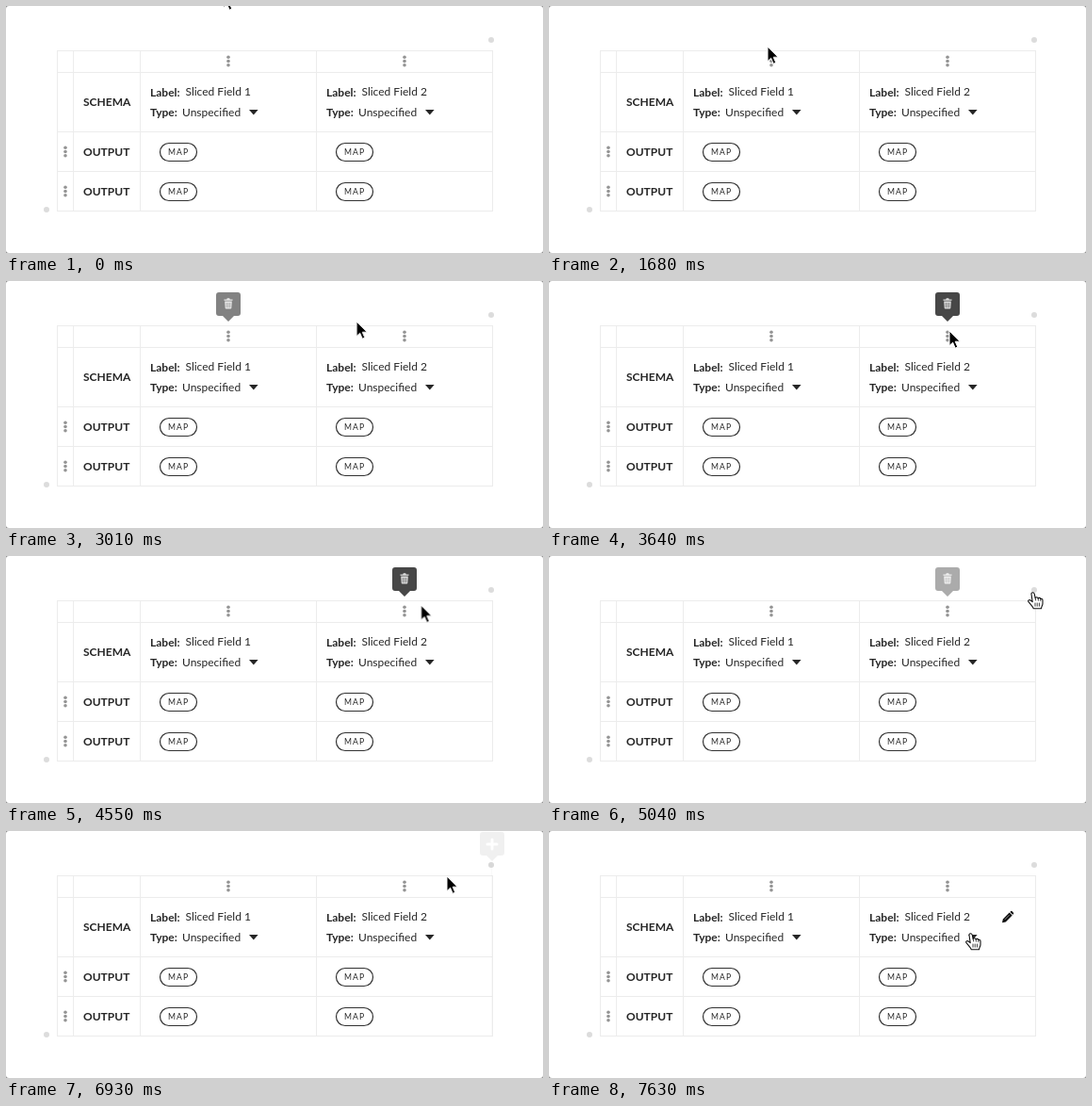
Write an HTML page that moves like this. It is 570 px wide and 262 px high and loops after 8000 ms.

```html
<!DOCTYPE html>
<html lang="en">
<head>
<meta charset="utf-8">
<title>Schema table</title>
<style>
  html, body { margin: 0; width: 100%; height: 100%; overflow: hidden; background: #8a8a8a; }
  svg { display: block; width: 570px; height: 262px; font: 12px Lato, sans-serif; fill: #262626; }
  .bold { font-weight: 700; }
  .grid { stroke: #ececec; fill: none; }
  .kebab, .knob { fill: #949494; }
  .knob { fill: #dcdcdc; }
  .pill rect { fill: #fff; stroke: #333; stroke-width: 1.2; }
  .pill text { font-size: 8.6px; letter-spacing: 1.1px; }

  #tip1, #tip2, #add, #pencil, #cursor, #arrow, #hand { animation: 8s linear infinite; }
  #tip1 { animation-name: tip1; }
  #tip2 { animation-name: tip2; }
  #add { animation-name: add; }
  #pencil { animation-name: pencil; }
  #cursor { animation-name: move; }
  #arrow { animation-name: arrow; animation-timing-function: step-end; }
  #hand { animation-name: hand; animation-timing-function: step-end; }

  @keyframes tip1 {
    0%, 21%, 40%, 100% { opacity: 0; }
    24.5%, 36.5% { opacity: 1; }
  }
  @keyframes tip2 {
    0%, 41.6%, 64.6%, 86.7%, 90.2%, 100% { opacity: 0; }
    45.4%, 61.1% { opacity: 1; }
    88.4% { opacity: .5; }
  }
  @keyframes add {
    0%, 63.9%, 86.9%, 100% { opacity: 0; }
    68.2%, 83.4% { opacity: 1; }
  }
  @keyframes pencil {
    0%, 88.4% { opacity: 0; }
    89.5%, 100% { opacity: 1; }
  }
  @keyframes move {
    0%, 13.2% { transform: translate(231px, -14px); animation-timing-function: ease-in-out; }
    21% { transform: translate(232px, 43px); }
    22.75%, 30.7% { transform: translate(235px, 56px); }
    34.1% { transform: translate(262px, 54px); }
    36.3% { transform: translate(332px, 46px); }
    37.63% { transform: translate(372px, 43px); }
    41.1% { transform: translate(402px, 45px); }
    42.9%, 54.3% { transform: translate(425px, 53px); }
    57.8% { transform: translate(446px, 52px); }
    61.2% { transform: translate(500px, 46px); }
    63%, 82.3% { transform: translate(514px, 39px); }
    84.9% { transform: translate(490px, 40px); }
    86.63% { transform: translate(468px, 48px); }
    88.4% { transform: translate(457px, 70px); }
    92.7% { transform: translate(449px, 103px); }
    95.3%, 100% { transform: translate(448px, 109px); }
  }
  @keyframes arrow {
    0%, 83.1% { opacity: 1; }
    62.1%, 93.6%, 100% { opacity: 0; }
  }
  @keyframes hand {
    0%, 83.1% { opacity: 0; }
    62.1%, 93.6%, 100% { opacity: 1; }
  }
</style>
</head>
<body>
<svg viewBox="0 0 570 262">
  <defs>
    <g id="dots"><circle cy="-4.2" r="1.8"/><circle r="1.8"/><circle cy="4.2" r="1.8"/></g>
    <path id="bubble" fill="#474747" d="M-10-31H10Q13-31 13-28V-9Q13-6 10-6H6L0 0L-6-6H-10Q-13-6-13-9V-28Q-13-31-10-31Z"/>
    <g id="trash" fill="#ddd">
      <path d="M-4.5-23.5h2.7l.6-1.3h2.4l.6 1.3h2.7v1.2h-9zM-3.8-21.5h7.6l-.5 7.3q-.1.8-.9.8h-4.8q-.8 0-.9-.8z"/>
      <path d="M-1.8-20v5.2M0-20v5.2M1.8-20v5.2" stroke="#474747" stroke-width=".6"/>
    </g>
    <g id="field">
      <text class="bold" x="153" y="95.6">Label:</text>
      <text class="bold" x="153" y="117">Type:</text>
      <text x="187" y="116.8">Unspecified</text>
      <path d="M258 110h9.6l-4.8 5.4z"/>
    </g>
    <g id="map" class="pill">
      <rect x="163.5" y="-9.5" width="39" height="19" rx="9.5"/>
      <text x="172" y="3.2">MAP</text>
    </g>
  </defs>

  <rect width="570" height="262" rx="3" fill="#fff"/>
  <path class="grid" d="M54 47.5H517M54 70.5H517M54 133.5H517M54 175.5H517M54 217.5H517M54.5 47V218M71.5 47V218M142.5 47V218M329.5 47V218M516.5 47V218"/>

  <g class="kebab">
    <use href="#dots" x="236" y="58.5"/>
    <use href="#dots" x="423" y="58.5"/>
    <use href="#dots" x="63" y="154.5"/>
    <use href="#dots" x="63" y="196.5"/>
  </g>
  <circle class="knob" cx="515" cy="36" r="3"/>
  <circle class="knob" cx="43" cy="216" r="3"/>

  <g class="bold">
    <text x="82" y="105.8">SCHEMA</text>
    <text x="82" y="159">OUTPUT</text>
    <text x="82" y="201">OUTPUT</text>
  </g>
  <use href="#field"/>
  <use href="#field" x="187"/>
  <text x="190.5" y="94.8">Sliced Field 1</text>
  <text x="377.5" y="94.8">Sliced Field 2</text>
  <use href="#map" y="155"/>
  <use href="#map" x="187" y="155"/>
  <use href="#map" y="197"/>
  <use href="#map" x="187" y="197"/>

  <g id="pencil" fill="#111">
    <path d="M481 97.3l.8-3.8 6.9-6.9 3 3-6.9 6.9zM489.4 85.9l.8-.8q.6-.5 1.2 0l1.6 1.6q.6.6 0 1.2l-.8.8z"/>
    <path d="M483.8 93.9l4.7-4.7" stroke="#fff" stroke-width=".5"/>
  </g>

  <g id="tip1"><use href="#bubble" x="236" y="43"/><use href="#trash" x="236" y="43"/></g>
  <g id="tip2"><use href="#bubble" x="423" y="43"/><use href="#trash" x="423" y="43"/></g>
  <g id="add">
    <path d="M515.5 36V217" stroke="#bbb"/>
    <circle cx="515" cy="36" r="3" fill="#aaa"/>
    <use href="#bubble" x="516" y="32"/>
    <path d="M516 9v10M511 14h10" stroke="#fff" stroke-width="3" stroke-linecap="round"/>
  </g>

  <g id="cursor">
    <path id="arrow" fill="#000" stroke="#fff" stroke-linejoin="round" d="M0 0V15.6L3.6 12.2L6.2 18.2L8.8 17.1L6.2 11.2H11.2Z"/>
    <g id="hand" stroke="#111" stroke-width="1.1" stroke-linejoin="round" stroke-linecap="round">
      <path fill="#fff" d="M-2 1.5C-2.3-.6 .6-.9 1.2 1.2L2.2 5.6C2.6 4.4 4.8 4.3 5.2 6C5.8 5 7.6 5.2 7.8 6.7C8.6 6 10 6.6 10 8V11.5C10 13.5 8.7 14 8.5 16.8H.2C0 15-1.5 14-2.5 12.6L-5 9.6C-6 8.2-4.2 7-2.9 8L-.8 9.6Z"/>
      <path fill="none" d="M2.2 5.6L2.6 8M5.2 6L5.4 8.2M7.8 6.7V8.6M2 11v3.2M4.2 11v3.2M6.4 11v3.2" stroke-width=".8"/>
    </g>
  </g>
</svg>
</body>
</html>
```
